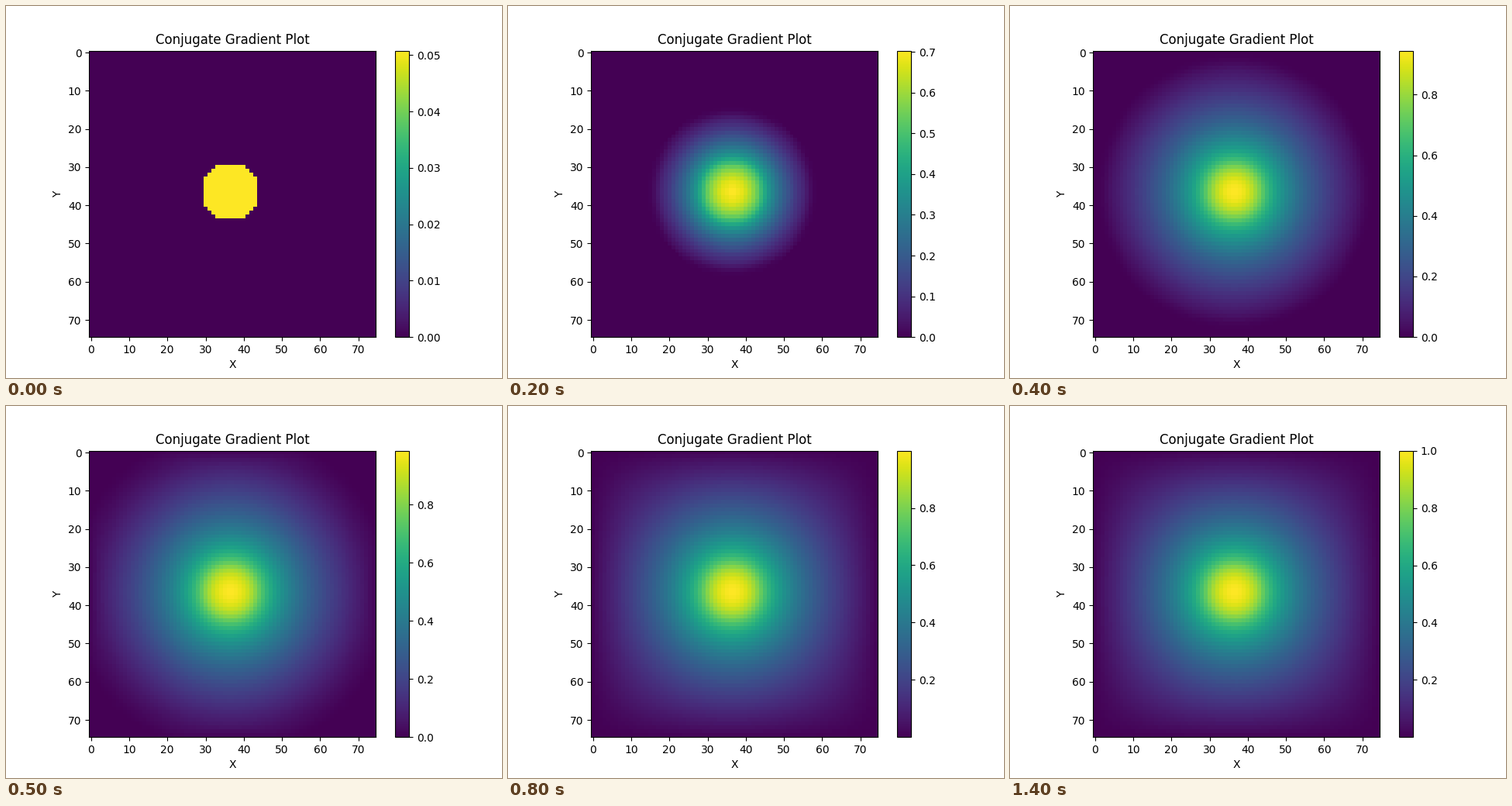
Recreate the animation shown at these times as a matplotlib script. Size 640 by 480 pixels, loop 2.6 s.

```python
import numpy as np
import matplotlib.pyplot as plt
from matplotlib.animation import FuncAnimation

N = 75        # grid cells per side
STRIDE = 10   # solver iterations per animation step
LAST = 14     # step at which the solution has settled
FRAMES = 26


def laplacian(u):
    """Five-point negative Laplacian with zero values outside the grid."""
    p = np.pad(u, 1)
    return 4 * u - p[:-2, 1:-1] - p[2:, 1:-1] - p[1:-1, :-2] - p[1:-1, 2:]


def solve(b, steps):
    """Conjugate gradient from zero, keeping every STRIDE-th iterate."""
    x = np.zeros_like(b)
    r = b.copy()
    p = r.copy()
    rr = np.sum(r * r)
    kept = []
    for k in range(steps * STRIDE + 1):
        q = laplacian(p)
        alpha = rr / np.sum(p * q)
        x = x + alpha * p
        r = r - alpha * q
        new = np.sum(r * r)
        p = r + new / rr * p
        rr = new
        if k % STRIDE == 0:
            kept.append(x)
    return kept


row, col = np.mgrid[1:N + 1, 1:N + 1]
disc = ((row - N / 2) ** 2 + (col - N / 2) ** 2 <= (N / 10) ** 2).astype(float)
states = solve(disc, LAST)
peak = states[-1].max()
states = [s / peak for s in states]

fig, ax = plt.subplots(figsize=(6.4, 4.8), dpi=100)
im = ax.imshow(states[0], cmap="viridis")
fig.colorbar(im, ax=ax)
ax.set_title("Conjugate Gradient Plot")
ax.set_xlabel("X")
ax.set_ylabel("Y")


def update(frame):
    k = min(frame, LAST)
    u = states[k]
    # the scale reaches 1.0 only once the solution has settled
    top = 1.0 if k == LAST else min(u.max(), 0.9999)
    im.set_data(u)
    im.set_clim(u.min(), top)
    return [im]


anim = FuncAnimation(fig, update, frames=FRAMES, interval=100,
                     repeat=True, repeat_delay=0, blit=False)
plt.show()
```
